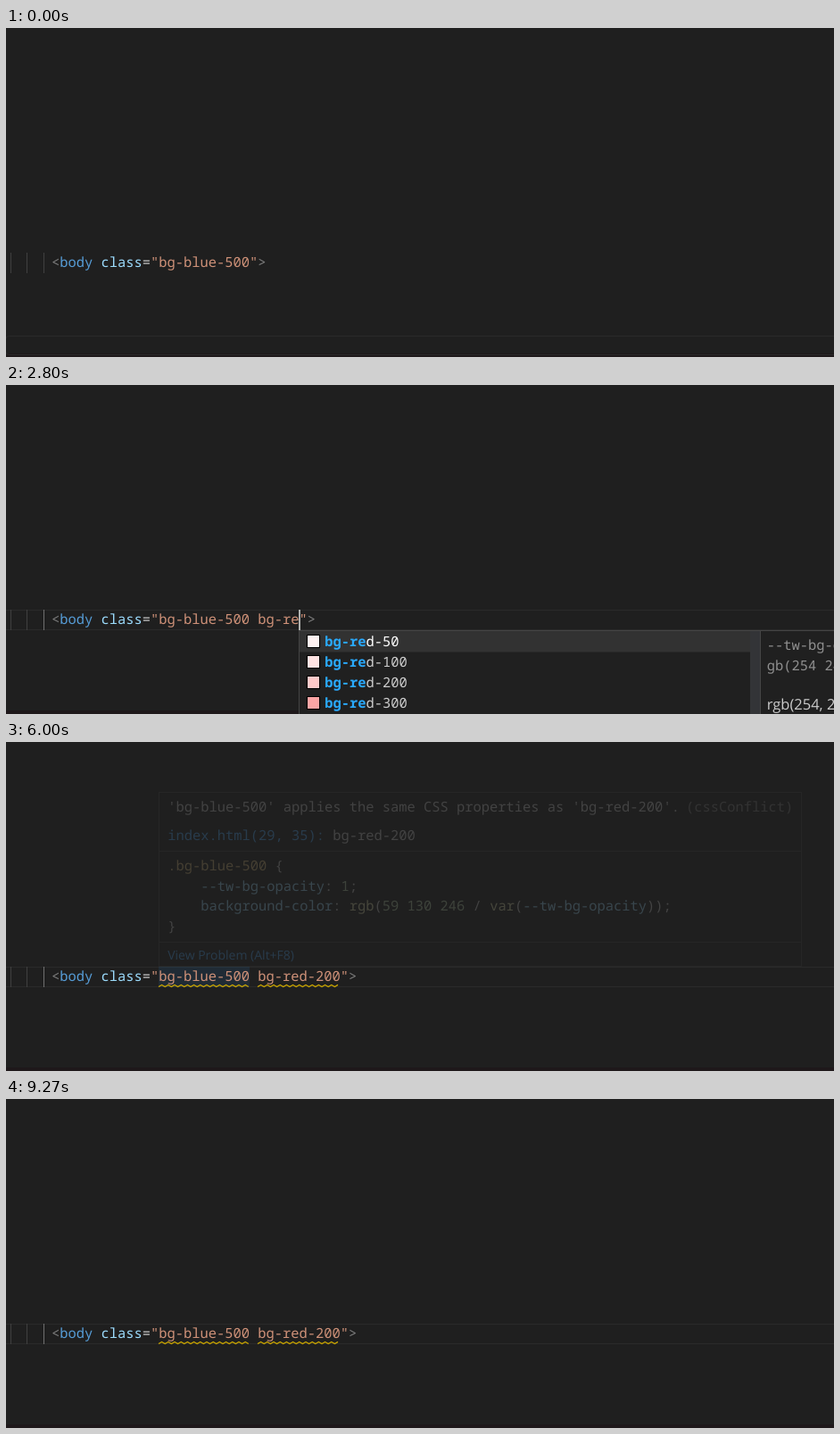
These frames come from a looping animation (928 by 369 pixels, 9340 ms). An HTML page:

```html
<!DOCTYPE html>
<html lang="en">
<head>
<meta charset="utf-8">
<title>Conflicting classes</title>
<style>
  html, body { margin: 0; width: 100%; height: 100%; overflow: hidden; background: #1f1f1f; }
  svg { display: block; }
  text {
    font: 15.433px "Noto Sans Mono", "DejaVu Sans Mono", monospace;
    white-space: pre;
    text-rendering: geometricPrecision;
  }
  .ui { font-family: "Open Sans", "Noto Sans", sans-serif; }
  .bold { font-weight: 700; }
</style>
</head>
<body>
<svg id="stage" width="928" height="369" viewBox="0 0 928 369"></svg>
<script>
const LOOP = 9340;
const ADVANCE = 9.26;
const CODE_X = 50.9;
const VALUE_X = CODE_X + 13 * ADVANCE;
const COLORS = {
  plain: '#cccccc', dim: '#808080', tag: '#569cd6', attr: '#9cdcfe', string: '#ce9178',
  selector: '#d7ba7d', number: '#b5cea8', fn: '#dcdcaa', link: '#4daafc',
  match: '#2aaaff', white: '#ffffff', detail: '#8f8f8f', border: '#454545', widget: '#202020'
};

const escapeText = s => s.replace(/&/g, '&amp;').replace(/</g, '&lt;').replace(/>/g, '&gt;');

// parts: [color, string, class?]
const text = (x, y, parts, attrs = '') =>
  `<text x="${x}" y="${y}" ${attrs}>` + parts.map(([color, s, cls = '']) =>
    `<tspan fill="${COLORS[color]}" class="${cls}">${escapeText(s)}</tspan>`).join('') + '</text>';

const rect = (x, y, w, h, fill, attrs = '') =>
  `<rect x="${x}" y="${y}" width="${w}" height="${h}" fill="${fill}" ${attrs}/>`;

const frame = (x, y, w, h, stroke, fill = 'none', attrs = '') =>
  rect(x + .5, y + .5, w - 1, h - 1, fill, `stroke="${stroke}" ${attrs}`);

const ICONS = {
  list: (x, y) => `<g transform="translate(${x} ${y})" fill="none" stroke="#d0d0d0" stroke-width="1.5">
    <rect x=".8" y="1.8" width="15.4" height="11" rx="1.2"/><path d="M4 5.7h9M4 9h9"/></g>`,
  palette: (x, y) => `<g transform="translate(${x} ${y})" fill="none" stroke="#c5c5c5" stroke-width="1.5">
    <path d="M1 6C2 2 6-.3 10 .3S17 4 16.3 8.5 13 15.500 10 15.500c-3 0-1-3-2.500-4.500S3 12.500 1.500 10.500 .7 7.500 1 6z"/>
    <g fill="#c5c5c5" stroke="none"><circle cx="5" cy="6.500" r="1.300"/><circle cx="8" cy="3.800" r="1.300"/>
    <circle cx="11.700" cy="4.600" r="1.300"/><circle cx="13.200" cy="8" r="1.300"/><circle cx="11.700" cy="11.300" r="1.300"/></g></g>`
};

const BACKGROUNDS = [['bg-inherit', 'list'], ['bg-current', 'palette'],
  ['bg-transparent', 'palette'], ['bg-black', '#000000']];
const REDS = [['bg-red-50', '#fef2f2'], ['bg-red-100', '#fee2e2'],
  ['bg-red-200', '#fecaca'], ['bg-red-300', '#fca5a5']];
const VARIANTS = ['first-letter:', 'first-line:', 'marker:', 'selection:'].map(s => [s, 'list']);
const B_ITEMS = [['before:', 'list'], ['backdrop:', 'list'], ['block', 'list'], ['bg-inherit', 'list']];

function details(x, items) {
  if (items === REDS) {
    return text(x, 297, [['detail', '--tw-bg-opacity']]) + text(x, 320, [['detail', 'gb(254 242 242)']]) +
      text(x, 364, [['plain', 'rgb(254, 242, 242)']], 'style="font-family:\'Open Sans\',sans-serif;font-size:16.5px"');
  }
  if (items === BACKGROUNDS) {
    return text(x, 297, [['detail', 'background-color: inherit;']]) +
      text(x, 339, [['selector', '.bg-inherit'], ['plain', ' {']]) +
      text(x, 362, [['attr', '    background-color']]);
  }
  return '';
}

function popup({ at, items, match, selected = 0 }) {
  const left = Math.floor(VALUE_X + at * ADVANCE);
  const reds = items === REDS;
  let out = frame(left, 275, 700, 120, COLORS.border, COLORS.widget);
  out += rect(left + 1, 276 + selected * 23, 505, 23.500, '#323232');
  items.forEach(([label, icon], i) => {
    const top = 276 + i * 22.9;
    const swatch = icon[0] === '#';
    out += swatch
      ? frame(left + 9, Math.round(top + 4), 15, 15, '#000000', icon)
      : ICONS[icon](left + 4.500, top + 4.500);
    out += text(left + (swatch ? 29.3 : 27.500), top + 17, [
      ['match', label.slice(0, match), 'bold'],
      [i === selected ? 'white' : 'plain', label.slice(match)]
    ]);
  });
  out += reds ? rect(left + 506, 276, 11, 100, '#333437') : rect(left + 506, 277, 11, 23, '#434343');
  out += rect(left + 517, 276, 1, 100, COLORS.border);
  return out + details(left + 524.700, items);
}

function tooltip(opacity) {
  const x = 181.2;
  return `<g opacity="${opacity}">` +
    frame(171, 56, 721, 196, COLORS.border, COLORS.widget) +
    rect(172, 122, 719, 1, COLORS.border) + rect(172, 224, 719, 1, COLORS.border) +
    text(x, 78, [['plain', "'bg-blue-500' applies the same CSS properties as 'bg-red-200'."]]) +
    text(762, 78, [['dim', '(cssConflict)']]) +
    text(x, 110, [['link', 'index.html(29, 35): '], ['plain', 'bg-red-200']]) +
    text(x, 144, [['selector', '.bg-blue-500'], ['plain', ' {']]) +
    text(x, 166.500, [['attr', '    --tw-bg-opacity'], ['plain', ': '], ['number', '1'], ['plain', ';']]) +
    text(x, 189, [['attr', '    background-color'], ['plain', ': '], ['fn', 'rgb'], ['plain', '('],
      ['number', '59 130 246'], ['plain', ' / '], ['fn', 'var'], ['plain', '('],
      ['attr', '--tw-bg-opacity'], ['plain', '));']]) +
    text(x, 212, [['plain', '}']]) +
    text(x, 244, [['link', 'View Problem (Alt+F8)', 'ui']], 'style="font-size:14px"') +
    '</g>';
}

function squiggle(from, to) {
  let d = `M${from} 274.5`;
  for (let x = from + 3.6, up = true; x <= to; x += 3.6, up = !up) d += `L${x.toFixed(1)} ${up ? 272.4 : 274.5}`;
  return `<path d="${d}" fill="none" stroke="#cca700" stroke-width="1.3"/>`;
}

function draw({ typed, caret, focus, list, warn, hover }) {
  let out = rect(0, 0, 928, 369, '#1f1f1f') + rect(0, 365, 928, 4, '#1e181a');
  out += focus
    ? frame(-5, 252, 940, 23, '#2a2a2a')
    : frame(-1, 345, 940, 22, '#2a2a2a', 'none', 'rx="4"');
  [5, 23, 42].forEach((x, i) => out += rect(x, 252, 1, 23, focus && i === 2 ? '#707070' : '#404040'));
  if (hover) out += rect(171, 252, 102, 23, '#264f78', 'fill-opacity=".25"');
  out += text(CODE_X, 268, [['dim', '<'], ['tag', 'body'], ['attr', ' class'], ['plain', '='],
    ['string', `"bg-blue-500${typed}"`], ['dim', '>']]);
  if (warn) out += squiggle(171, 273) + squiggle(282, 375);
  if (caret) out += rect(Math.floor(VALUE_X + .01 + (11 + typed.length) * ADVANCE), 252, 2, 23, '#aeafad');
  if (list) out += popup(list);
  if (hover) out += tooltip(hover);
  return out;
}

const reds = (at, match, selected) => ({ at, items: REDS, match, selected });
const backgrounds = (at, match) => ({ at, items: BACKGROUNDS, match });
const on = { caret: true }, off = { caret: false };

// Each step overrides part of the previous state.
const STEPS = [
  [0, { typed: '', caret: false, focus: false, list: null, warn: false, hover: 0 }],
  [600, { focus: true, caret: true }],
  [1130, off],
  [1330, { typed: ' ', caret: true }],
  [1530, { list: { at: 12, items: VARIANTS, match: 0 } }],
  [1670, { typed: ' b' }],
  [1730, { list: { at: 13, items: B_ITEMS, match: 1 } }],
  [1800, { typed: ' bg' }],
  [1870, { list: backgrounds(14, 2) }],
  [2330, off],
  [2470, { typed: ' bg-', caret: true, list: backgrounds(15, 3) }],
  [2730, { typed: ' bg-r', list: reds(16, 4, 0) }],
  [2800, { typed: ' bg-re', list: reds(17, 5, 0) }],
  [3000, { typed: ' bg-red', list: reds(18, 6, 0) }],
  [3530, { caret: false, list: reds(18, 6, 1) }],
  [3730, { list: reds(18, 6, 2) }],
  [4070, { typed: ' bg-red-200', caret: true, list: null }],
  [4530, off],
  [4800, { warn: true }],
  [5070, on],
  [5530, off],
  [6000, { hover: .2 }],
  [6070, { hover: .8, caret: true }],
  [6130, { hover: 1 }],
  [6530, off],
  [7000, on],
  [7530, off],
  [8000, on],
  [8530, off],
  [8800, { hover: 0 }],
  [9070, on],
  [9270, off]
];

let state = {};
const scenes = STEPS.map(([time, change]) => {
  state = { ...state, ...change };
  return { time, markup: draw(state) };
});

const stage = document.getElementById('stage');
const start = performance.now();
let shown = null;

function tick() {
  const t = (performance.now() - start) % LOOP;
  const scene = scenes.findLast(s => s.time <= t);
  if (scene !== shown) {
    stage.innerHTML = scene.markup;
    shown = scene;
  }
  requestAnimationFrame(tick);
}
tick();
</script>
</body>
</html>
```
